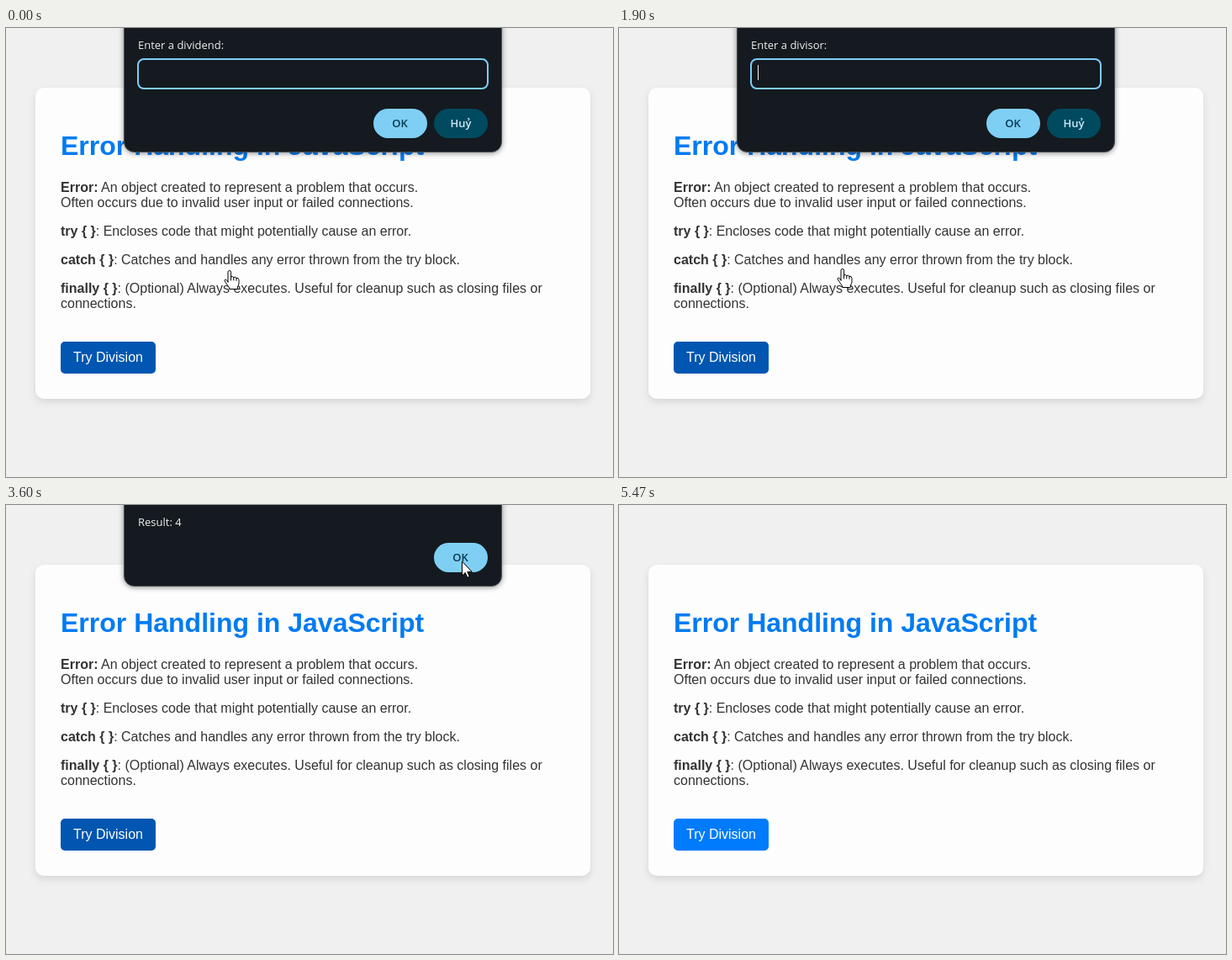
An HTML page for the animation above (5.5 s loop, 722 px wide and 534 px high).

```html
<!DOCTYPE html>
<html lang="en">
<head>
<meta charset="utf-8">
<title>Error Handling in JavaScript</title>
<style>
  html, body { margin: 0; width: 100%; height: 100%; overflow: hidden; background: #f0f0f1; }
  svg { display: block; position: absolute; left: 0; top: 0; }
  .page { font: 16px "Liberation Sans", Arial, sans-serif; fill: #333; }
  .page .title { font-size: 32px; font-weight: bold; fill: #007bf2; }
  .page .label { fill: #fff; }
  .bold { font-weight: bold; }
  .card { fill: #fdfdfd; filter: drop-shadow(0 4px 4px rgba(0, 0, 0, .1)); }
  .dialog { font: 13px "Open Sans", "Noto Sans", sans-serif; fill: #f0f0f0; }
  .panel { fill: #141a1f; stroke: #4b4f53; filter: drop-shadow(0 1px 3px rgba(0, 0, 0, .45)); }
  .outline { fill: none; stroke: #7fccf6; stroke-width: 2; }
  .primary { fill: #7fcff4; }
  .second { fill: #004a60; }
  .action { font-weight: 600; text-anchor: middle; fill: #063a50; }
  .action.light { fill: #cbeafa; }
  .cursor { fill: #fff; stroke: #000; stroke-linejoin: round; stroke-linecap: round; }
</style>
</head>
<body>
<svg width="722" height="534" viewBox="0 0 722 534">
  <g class="page">
    <rect class="card" x="35" y="71" width="660" height="370" rx="10"/>
    <text class="title" x="65" y="151">Error Handling in JavaScript</text>
    <text x="65" y="195"><tspan class="bold">Error:</tspan> An object created to represent a problem that occurs.</text>
    <text x="65" y="213">Often occurs due to invalid user input or failed connections.</text>
    <text x="65" y="247"><tspan class="bold">try { }</tspan>: Encloses code that might potentially cause an error.</text>
    <text x="65" y="281"><tspan class="bold">catch { }</tspan>: Catches and handles any error thrown from the try block.</text>
    <text x="65" y="315"><tspan class="bold">finally { }</tspan>: (Optional) Always executes. Useful for cleanup such as closing files or</text>
    <text x="65" y="333">connections.</text>
    <rect id="button" x="65" y="373" width="113" height="38" rx="5"/>
    <text class="label" x="80" y="397">Try Division</text>
  </g>

  <g class="dialog" id="dialog">
    <rect class="panel" id="panel" x="140.5" y="-30" width="449" rx="12"/>
    <text id="message" x="157" y="25"></text>
    <g id="prompt">
      <rect class="outline" x="157" y="37" width="416" height="35" rx="7"/>
      <text id="value" x="165.5" y="59"></text>
      <rect id="caret" y="44" width="1" height="18"/>
      <rect class="primary" x="437" y="96" width="64" height="35" rx="17.5"/>
      <text class="action" x="468.5" y="118">OK</text>
      <rect class="second" x="509" y="96" width="64" height="35" rx="17.5"/>
      <text class="action light" x="541" y="118">Huỷ</text>
    </g>
    <g id="alert">
      <rect class="outline" id="ring" x="506" y="42" width="70" height="41" rx="20.5"/>
      <rect class="primary" x="509" y="45" width="64" height="35" rx="17.5"/>
      <text class="action" x="540.5" y="67">OK</text>
    </g>
  </g>

  <g class="cursor" id="cursor">
    <path id="arrow" d="M.5 .5V17L4.3 13.4 6.8 19.3 9.3 18.2 6.8 12.4H11.8Z"/>
    <path id="hand" d="M-1 14V2.3Q-1 .5 .8 .5T2.6 2.3V8Q4.4 6.6 5.8 8.6 7.6 7.4 9 9.4 11.6 8.6 12 11.5V15.5Q12 18 10.4 20V22.5H.6V20.6Q-1 19-2.6 16.2L-4.9 12.8Q-5.2 11-3.6 11.1-2.4 11.4-1 14ZM2.6 8V12M5.8 8.6V12M9 9.4V12.4"/>
  </g>
</svg>

<script>
const LOOP = 5500;
const CURSOR_HIDES = 4830;
const RING_HIDES = 3580;
const BLINK = 500;
const OPEN_TIME = 100;
const CLOSE_TIME = 100;

// keys: [time, value]; the caret starts a new blink at each of them
const dialogs = [
  { open: -300, close: 780, message: "Enter a dividend:",
    keys: [[-500, ""], [570, "1"], [680, "12"]] },
  { open: 880, close: 2580, message: "Enter a divisor:",
    keys: [[880, ""], [2390, "3"]] },
  { open: 2680, close: 3690, message: "Result: 4", alert: true }
];

// [time, x, y] of the pointer's tip
const path = [
  [0, 265, 288], [300, 265, 288], [420, 265, 286], [2930, 265, 286],
  [3070, 277, 265], [3200, 400, 160], [3360, 542, 67],
  [3760, 542, 67], [3860, 542, 71], [LOOP, 542, 71]
];

const $ = id => document.getElementById(id);
const set = (id, name, value) => $(id).setAttribute(name, value);
const show = (id, on) => set(id, "visibility", on ? "visible" : "hidden");
const clamp = v => Math.max(0, Math.min(1, v));

function pointAt(t) {
  const i = path.findIndex(p => p[0] > t);
  const [t0, x0, y0] = path[i - 1];
  const [t1, x1, y1] = path[i];
  const k = (t - t0) / (t1 - t0);
  return [x0 + (x1 - x0) * k, y0 + (y1 - y0) * k];
}

function drawInput(keys, t) {
  const [time, value] = keys.filter(k => k[0] <= t).pop();
  $("value").textContent = value;
  set("caret", "x", 165 + value.length * 7.5);
  show("caret", Math.floor((t - time) / BLINK) % 2 === 0);
}

function drawDialog(t) {
  const d = dialogs.find(d => t >= d.open && t < d.close + CLOSE_TIME);
  set("dialog", "display", d ? "inline" : "none");
  if (!d) return;

  const shown = clamp((t - d.open) / OPEN_TIME);
  const gone = clamp((t - d.close) / CLOSE_TIME);
  const scale = 1 + gone * .0175;
  const lift = -25 * gone - 8 * (1 - shown);
  set("dialog", "opacity", shown * (1 - gone));
  set("dialog", "transform", `translate(${365 * (1 - scale)} ${lift}) scale(${scale} 1)`);

  set("panel", "height", d.alert ? 126.5 : 177.5);
  $("message").textContent = d.message;
  set("prompt", "display", d.alert ? "none" : "inline");
  set("alert", "display", d.alert ? "inline" : "none");
  show("ring", d.alert && t < RING_HIDES);
  if (!d.alert) drawInput(d.keys, t);
}

function drawCursor(t) {
  const [x, y] = pointAt(t);
  const overPage = y > 96;
  set("cursor", "transform", `translate(${Math.round(x)} ${Math.round(y)})`);
  set("cursor", "display", t < CURSOR_HIDES ? "inline" : "none");
  show("hand", overPage);
  show("arrow", !overPage);
}

function render(t) {
  set("button", "fill", t < dialogs[2].close ? "#0056b0" : "#007bfc");
  drawDialog(t);
  drawCursor(t);
}

const start = performance.now();
function tick() {
  render((performance.now() - start) % LOOP);
  requestAnimationFrame(tick);
}
tick();
</script>
</body>
</html>
```
